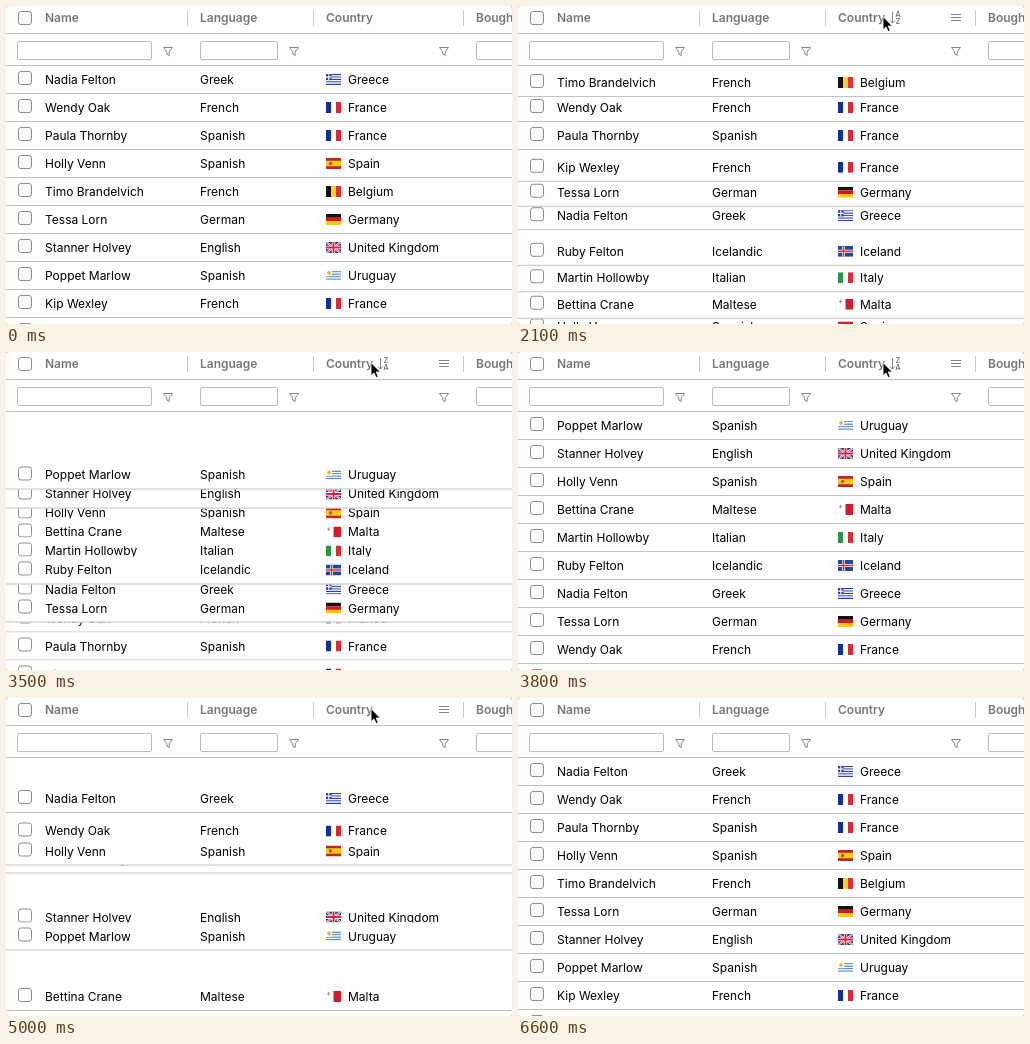
An HTML page for the animation above (6900 ms loop, 506x318 px).

```html
<!DOCTYPE html>
<html lang="en">
<head>
<meta charset="utf-8">
<title>Sortable table</title>
<style>
  html, body { margin: 0; width: 100%; height: 100%; overflow: hidden; background: #bbb; }
  #stage { position: relative; width: 506px; height: 318px; overflow: hidden; background: #fff;
    border-radius: 3px; font: 12px/27px Inter, "Liberation Sans", sans-serif; color: #000; }
  #stage * { position: absolute; box-sizing: border-box; white-space: nowrap; }
  #stage svg * { position: static; }
  #rows { top: 60px; left: 0; width: 506px; height: 258px; overflow: hidden; }
  .row { top: 0; left: 0; width: 506px; height: 28px; background: #fff; border-bottom: 1px solid #c2c2c2; }
  .row span { top: 0; }
  .box { left: 12px; width: 14px; height: 14px; border: 1px solid #8c8c8c; border-radius: 3px; }
  .row .box { top: 5px; }
  .row svg { left: 320px; top: 8px; }
  .head { top: -2px; font-weight: 600; color: #777; }
  .sep { top: 4px; width: 1px; height: 16px; background: #c8c8c8; }
  .line { left: 0; width: 506px; height: 1px; background: #c2c2c2; }
  .input { top: 35px; height: 19px; border: 1px solid #bbb; border-radius: 2px; }
  #icons { left: 0; top: 0; }
</style>
</head>
<body>
<div id="stage">
  <div id="rows"></div>
  <i class="line" style="top:27px"></i>
  <i class="line" style="top:59px"></i>
  <i class="box" style="top:5px"></i>
  <span class="head" style="left:39px">Name</span>
  <span class="head" style="left:194px">Language</span>
  <span class="head" style="left:320px">Country</span>
  <span class="head" style="left:470px">Bought</span>
  <i class="sep" style="left:181px"></i>
  <i class="sep" style="left:307px"></i>
  <i class="sep" style="left:457px"></i>
  <i class="input" style="left:11px;width:135px"></i>
  <i class="input" style="left:194px;width:78px"></i>
  <i class="input" style="left:470px;width:78px"></i>
  <svg id="icons" width="506" height="60" fill="none" stroke="#858585">
    <defs><path id="funnel" d="M-4.5-4h9L1.2 .3V4l-2.4-1.3V.3z" stroke-linejoin="round"/></defs>
    <use href="#funnel" x="162" y="45.5"/>
    <use href="#funnel" x="288" y="45.5"/>
    <use href="#funnel" x="438" y="45.5"/>
    <path id="menu" d="M433 8.5h10M433 11.5h10M433 14.5h10"/>
    <g id="sort">
      <path d="M374.5 6v11M372 14.5l2.5 2.5 2.5-2.5"/>
      <g fill="#777" stroke="none" font-size="7.5" font-weight="600" text-anchor="middle">
        <text id="upper" x="380" y="10.5"></text>
        <text id="lower" x="380" y="17.5"></text>
      </g>
    </g>
    <path id="cursor" d="M365 10.5v13.2l3-2.8 2 4.7 2.2-.9-2-4.6h4.2z" fill="#000" stroke="#fff" stroke-width=".9"/>
  </svg>
</div>
<script>
const $ = id => document.getElementById(id);
const rect = (x, y, w, h, c) => `<rect x="${x}" y="${y}" width="${w}" height="${h}" fill="${c}"/>`;
const path = (d, c, w) => `<path d="${d}" stroke="${c}" stroke-width="${w}" fill="none"/>`;
const dot = (x, y, r, c) => `<circle cx="${x}" cy="${y}" r="${r}" fill="${c}"/>`;
const upright = (...cs) => cs.map((c, i) => rect(i * 5, 0, 5, 10, c)).join('');
const stripes = (n, a, b) =>
  Array.from({ length: n }, (_, i) => rect(0, i * 10 / n, 15, 10 / n, i % 2 ? b : a)).join('');
const diagonals = 'M0 0L15 10M15 0L0 10';
const nordic = 'M5.5 0V10M0 5H15';
const cross = 'M7.5 0V10M0 5H15';

const flags = {
  Greece: stripes(9, '#2a3fa8', '#fff') + rect(0, 0, 5.6, 5.6, '#2a3fa8') + path('M2.8 0V5.6M0 2.8H5.6', '#fff', 1.1),
  France: upright('#12309a', '#fff', '#d8283a'),
  Spain: rect(0, 0, 15, 10, '#c8202c') + rect(0, 2.5, 15, 5, '#f8c81c') + dot(4.5, 5, 1.6, '#a8542c'),
  Belgium: upright('#111', '#f8d030', '#e0303c'),
  Germany: rect(0, 0, 15, 3.4, '#111') + rect(0, 3.4, 15, 3.3, '#d81818') + rect(0, 6.7, 15, 3.3, '#f8c810'),
  'United Kingdom': rect(0, 0, 15, 10, '#26357c') + path(diagonals, '#fff', 2) + path(diagonals, '#d02840', .8) +
    path(cross, '#fff', 3.4) + path(cross, '#d02840', 1.9),
  Uruguay: stripes(9, '#fff', '#4a80d0') + rect(0, 0, 6, 5.6, '#fff') + dot(3, 2.8, 1.8, '#e8b830'),
  Iceland: rect(0, 0, 15, 10, '#1c4a94') + path(nordic, '#fff', 2.6) + path(nordic, '#d83040', 1.3),
  Italy: upright('#2a9448', '#fff', '#d43038'),
  Malta: rect(0, 0, 7.5, 10, '#fff') + rect(7.5, 0, 7.5, 10, '#cc2030') + path('M2.5 1V4M1 2.5H4', '#c08888', 1)
};

const people = [
  ['Nadia Felton', 'Greek', 'Greece'],
  ['Wendy Oak', 'French', 'France'],
  ['Paula Thornby', 'Spanish', 'France'],
  ['Holly Venn', 'Spanish', 'Spain'],
  ['Timo Brandelvich', 'French', 'Belgium'],
  ['Tessa Lorn', 'German', 'Germany'],
  ['Stanner Holvey', 'English', 'United Kingdom'],
  ['Poppet Marlow', 'Spanish', 'Uruguay'],
  ['Kip Wexley', 'French', 'France'],
  ['Bettina Crane', 'Maltese', 'Malta'],
  ['Martin Hollowby', 'Italian', 'Italy'],
  ['Ruby Felton', 'Icelandic', 'Iceland']
];

$('rows').innerHTML = people.map(([name, language, country]) => `<div class="row"><i class="box"></i>
  <span style="left:39px">${name}</span><span style="left:194px">${language}</span>
  <svg width="15" height="11" viewBox="0 0 15 10" preserveAspectRatio="none">${flags[country]}</svg>
  <span style="left:342px">${country}</span></div>`).join('');
const rows = [...$('rows').children];

// Place of each person when sorted by country; 0 keeps the given order
function places(direction) {
  const order = [...people].sort((a, b) => direction * (a[2] < b[2] ? -1 : a[2] > b[2] ? 1 : 0));
  return people.map(p => order.indexOf(p));
}
const layouts = [0, 1, -1, 0].map(places);
const clicks = [1784, 3284, 4784];
const LOOP = 6900, STEP = 100, SLIDE = 400, ENTER = 1300, LEAVE = 5800;
const clamp = v => Math.min(1, Math.max(0, v));

// CSS "ease" curve
function ease(x) {
  if (x <= 0 || x >= 1) return clamp(x);
  let lo = 0, hi = 1, s = .5;
  for (let i = 0; i < 20; i++) {
    s = (lo + hi) / 2;
    if (.75 * s * (1 - s) + s ** 3 < x) lo = s; else hi = s;
  }
  return .3 * s * (1 - s) ** 2 + 3 * s * s * (1 - s) + s ** 3;
}

function draw(now) {
  const t = Math.floor(now % LOOP / STEP) * STEP;
  const state = clicks.filter(c => t >= c).length;
  const progress = state ? ease((t - clicks[state - 1]) / SLIDE) : 1;
  const from = layouts[Math.max(0, state - 1)], to = layouts[state];
  rows.forEach((row, i) => {
    row.style.transform = `translateY(${28 * (from[i] + (to[i] - from[i]) * progress)}px)`;
  });
  $('sort').style.opacity = state % 3 ? 1 : 0;
  $('upper').textContent = state === 2 ? 'Z' : 'A';
  $('lower').textContent = state === 2 ? 'A' : 'Z';
  $('cursor').style.opacity = t >= ENTER && t < LEAVE ? 1 : 0;
  $('menu').style.opacity = clamp((t - ENTER) / 200) * clamp(1 - (t - LEAVE) / 200);
}

const start = performance.now();
(function tick() {
  draw(performance.now() - start);
  requestAnimationFrame(tick);
})();
</script>
</body>
</html>
```
